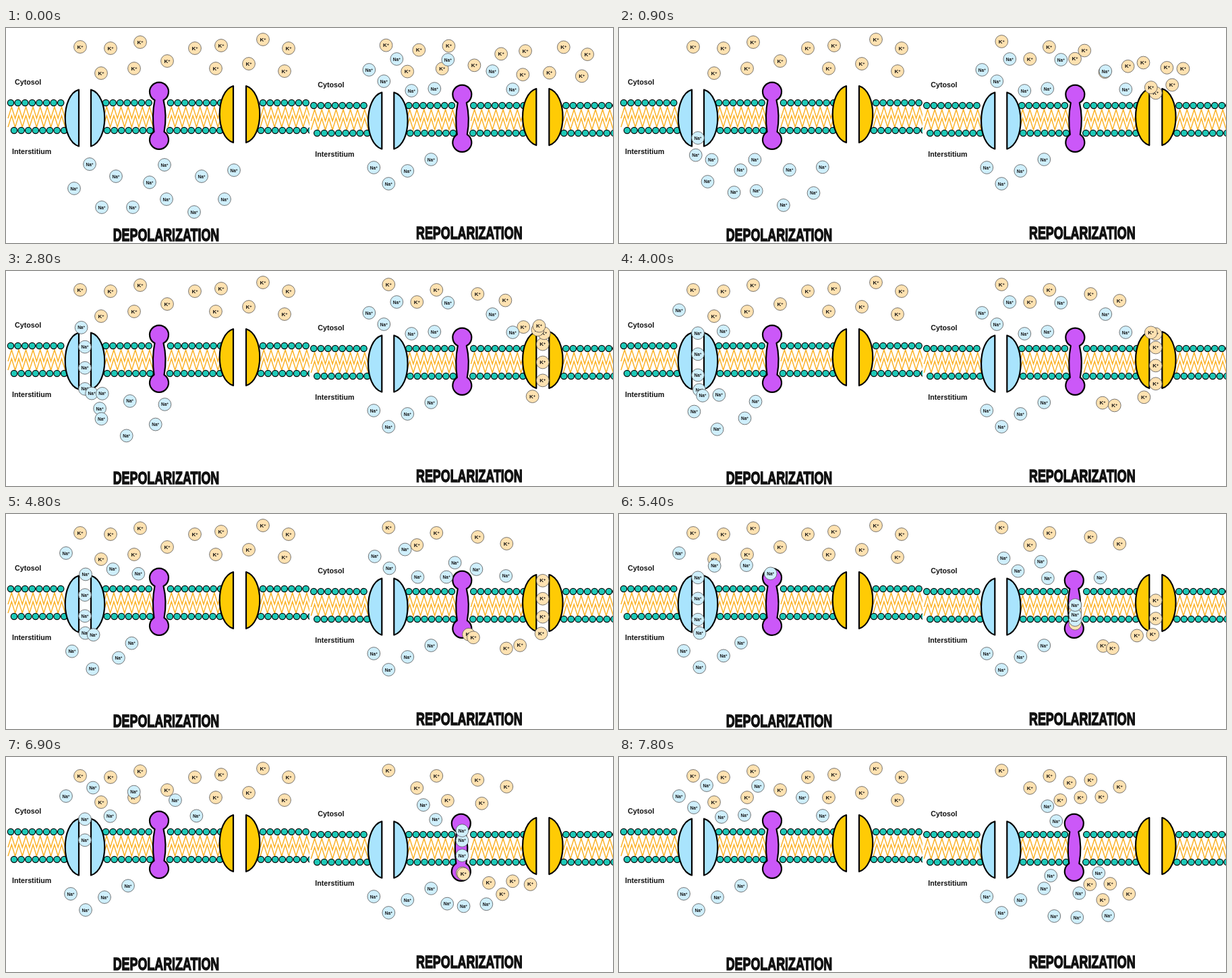
Recreate the animation shown at these times as an HTML page. Size 900 px wide and 319 px high, loop 7.9 s.

```html
<!DOCTYPE html>
<html lang="en">
<head>
<meta charset="utf-8">
<title>Depolarization and repolarization</title>
<style>
html, body { margin: 0; width: 100%; height: 100%; overflow: hidden; background: #fff; }
svg { display: block; }
text { font-family: "Liberation Sans", Arial, sans-serif; font-weight: bold; fill: #111; }
.label { font-size: 10.7px; }
.title { font-size: 26.5px; text-anchor: middle; stroke: #111; stroke-width: 1.5px; }
.ion text { text-anchor: middle; }
.ion circle { stroke: #555; stroke-width: .8px; }
.head { fill: #1ec9b8; stroke: #000; stroke-width: 1.2px; }
.tail { fill: none; stroke: #fbb32b; stroke-width: 1.5px; }
.protein { stroke: #000; stroke-width: 2.2px; stroke-linejoin: round; }
</style>
</head>
<body>
<svg width="900" height="319" viewBox="0 0 900 319">
  <svg id="left" width="450" height="319"></svg>
  <svg id="right" x="450" width="450" height="319"></svg>
</svg>
<script>
// Times are counted in steps of 100 ms.
const STEP = 100, STEPS = 79, END = STEPS - 1;
const PITCH = 10.6, EASE = 1.4, DRIFT = 3, SAG = 25;

function zigzag(x, n, high, low) {
  let d = '';
  for (let i = 0; i <= n * 2; i++)
    d += `${i ? 'L' : 'M'}${x - 4 + i * PITCH / 2},${i % 2 ? high : low}`;
  return `<path class="tail" d="${d}"/>`;
}

function heads(x, y, n) {
  let s = '';
  for (let i = 0; i < n; i++)
    s += `<circle class="head" cx="${x + i * PITCH}" cy="${y}" r="4.7"/>`;
  return s;
}

const membrane = (top, bottom, n) =>
  zigzag(top, n, 117, 134) + zigzag(top, n, 130, 147) +
  heads(top, 111, n) + heads(bottom, 152, n);

function channel(x1, x2, y, color) {
  const half = (x, side) => `M${x},${y}C${x + side * 27},${y + 8} ${x + side * 27},${y + 76} ${x},${y + 84}Z`;
  return `<path class="protein" fill="${color}" d="${half(x1, -1)}${half(x2, 1)}"/>`;
}

const pumpShape = `<path class="protein pump" fill="#cb58f8"
  d="M220.5,107A14,14 0 1 1 233.5,107Q239,130 234.5,154A14,14 0 1 1 219.5,154Q216,130 220.5,107Z"/>`;

function panel(id, title, titleY, dx, dy) {
  const svg = document.getElementById(id);
  svg.innerHTML = `
    <g transform="translate(${dx},${dy})">
      ${membrane(7, 12, 8)}${membrane(148, 150, 7)}${membrane(244, 243, 8)}${membrane(381, 378, 8)}
      ${channel(108, 126, 91.5, '#a9e4fd')}${channel(337, 356, 86, '#ffcb05')}${pumpShape}
      <text class="label" x="13" y="83.5">Cytosol</text>
      <text class="label" x="9" y="186.5">Interstitium</text>
    </g>
    <text class="title" transform="translate(${237.5 + dx},${titleY}) scale(.675,1)">${title}</text>`;
  return svg.querySelector('g');
}

const left = panel('left', 'DEPOLARIZATION', 315.5, 0, 0);
const right = panel('right', 'REPOLARIZATION', 312.5, -.7, 4);
const rightPump = right.querySelector('.pump');

const KINDS = {
  Na: { fill: '#cfeffc', size: 6.5 },
  K: { fill: '#ffe2b1', size: 8 }
};

// Passages through the proteins; mid is when an ion is halfway.
const inBlue = i => ({ mid: 16 + 7.25 * i, half: 10, from: [117, 176], to: [117, 90] });
const outYellow = i => ({ mid: 17 + 5.5 * i, half: 8.5, from: [346.5, 90], to: [346.5, 173] });
const pumpOut = mid => ({ mid, half: 2, from: [227, 94], to: [227, 168] });
const pumpIn = mid => ({ mid, half: 2, from: [227, 168], to: [227, 94] });

// Ease to each passage, cross it evenly, then drift to the end point.
function route(begin, start, end, passages) {
  const legs = [];
  let t = begin, at = start;
  const go = (until, to, ease, sag = 0) => {
    legs.push({ t, until, at, to, ease, sag });
    [t, at] = [until, to];
  };
  passages.forEach(({ mid, half, from, to }, i) => {
    go(mid - half, from, EASE, i && SAG);
    go(mid + half, to, 1);
  });
  const time = Math.hypot(end[0] - at[0], end[1] - at[1]) / DRIFT;
  go(Math.min(END, t + Math.max(1, time)), end, EASE);
  return legs;
}

function place(legs, step) {
  const { t, until, at, to, ease, sag } = legs.findLast(leg => leg.t <= step) || legs[0];
  const p = Math.min(1, Math.max(0, (step - t) / (until - t)));
  const e = 1 - (1 - p) ** ease;
  return [at[0] + (to[0] - at[0]) * e, at[1] + (to[1] - at[1]) * e + sag * Math.sin(Math.PI * e)];
}

const ions = [];
function ion(parent, kind, begin, start, end, passages = []) {
  const { fill, size } = KINDS[kind];
  const g = document.createElementNS('http://www.w3.org/2000/svg', 'g');
  g.setAttribute('class', 'ion');
  g.innerHTML = `<circle r="9.4" fill="${fill}"/><text y="2.5" font-size="${size}">${kind}<tspan dy="-2" font-size="${size * .7}">+</tspan></text>`;
  parent.append(g);
  ions.push({ g, legs: route(begin, start, end, passages) });
}

// Both lists run in the order of passage; the last ions never cross.
const CROSSING = 8;
const sodium = {
  outside: [[124, 202], [101, 238], [163, 220], [142, 266], [213, 229], [235, 203],
    [188, 266], [290, 220], [238, 254], [338, 211], [324, 254], [279, 273]],
  settled: [[89, 58], [302, 87], [272, 60], [206, 43], [130, 42], [186, 86],
    [152, 89], [111, 75], [96, 203], [181, 191], [146, 208], [118, 227]],
  pumped: [[186, 69], [262, 168], [276, 231], [230, 234], [233, 198], [196, 232],
    [191, 172], [199, 91]],
  batch: [, 1, 0, 0, 1, 0, 1]
};
const potassium = {
  inside: [[360, 53], [311, 60], [413, 64], [381, 17], [419, 30], [280, 30], [319, 26],
    [239, 49], [110, 28], [155, 30], [141, 67], [190, 60], [199, 21]],
  settled: [[205, 60], [266, 55], [219, 34], [235, 56], [249, 185], [268, 208], [279, 184],
    [307, 199], [118, 16], [189, 24], [160, 42], [250, 30], [293, 40]]
};

potassium.inside.forEach((start, i) => {
  ion(left, 'K', 0, start, start);
  const passages = i < CROSSING ? [outYellow(i)] : [];
  if (i < 4) passages.push(pumpIn(54.5 + 17 * (i >> 1) + i % 2));
  ion(right, 'K', -2, start, potassium.settled[i], passages);
});

sodium.outside.forEach((start, i) => {
  const mid = sodium.settled[i], batch = sodium.batch[i];
  ion(left, 'Na', 0, start, mid, i < CROSSING ? [inBlue(i)] : []);
  ion(right, 'Na', 46, mid, sodium.pumped[i] || mid,
    batch === undefined ? [] : [pumpOut(52 + 16 * batch + .4 * i)]);
});

function draw() {
  const step = Math.floor(performance.now() / STEP) % STEPS;
  for (const { g, legs } of ions)
    g.setAttribute('transform', `translate(${place(legs, step)})`);
  rightPump.setAttribute('transform', `translate(${step > 49 ? -1.5 : 0},0)`);
  requestAnimationFrame(draw);
}
draw();
</script>
</body>
</html>
```
